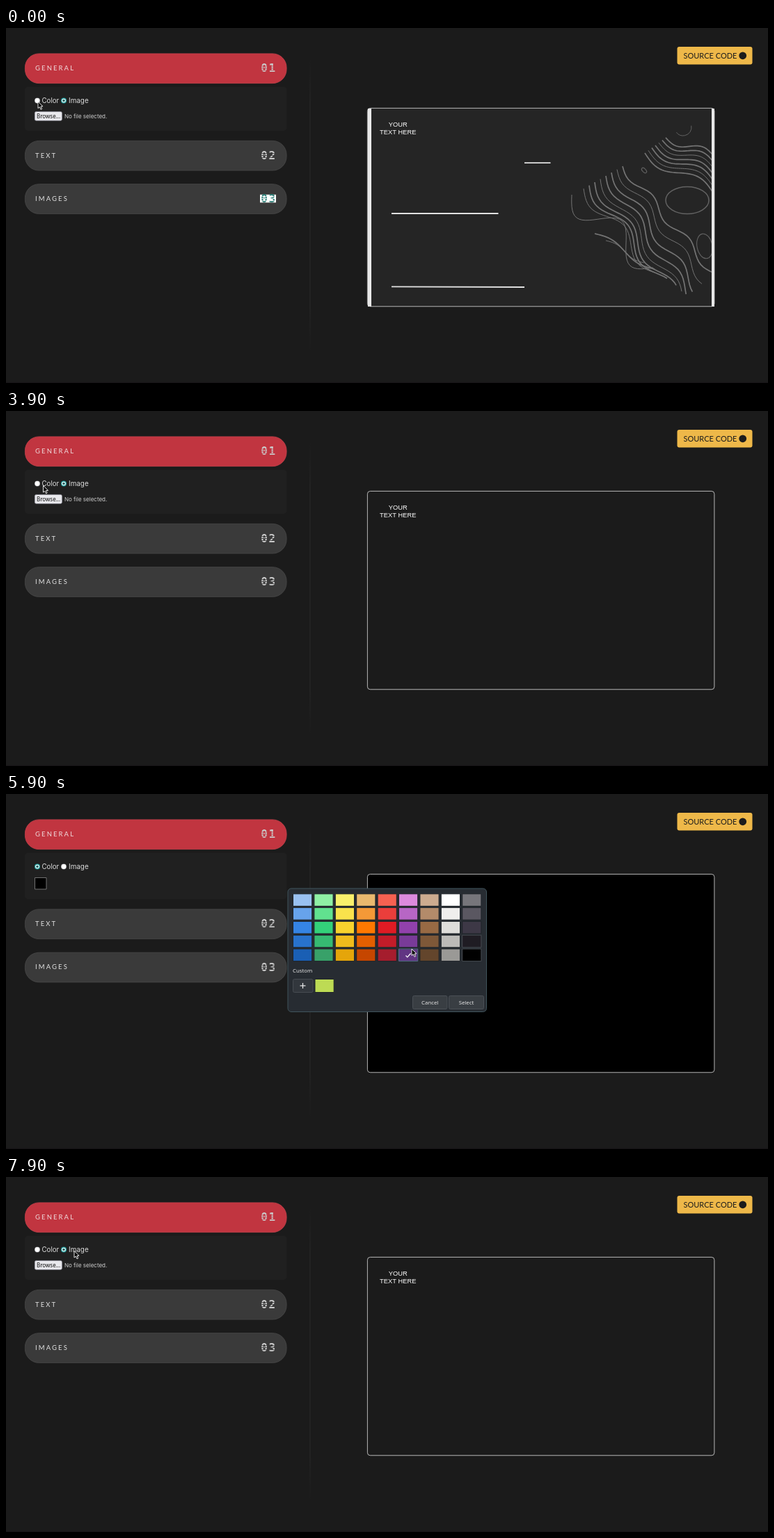
Recreate the animation shown at these times as an HTML page with a canvas. Size 1095 by 511 pixels, loop 8000 ms.

```html
<!DOCTYPE html>
<html lang="en">
<head>
<meta charset="utf-8">
<title>Cover editor</title>
<style>
html, body { margin: 0; width: 100%; height: 100%; overflow: hidden; background: #1b1b1b; }
canvas { display: block; }
</style>
</head>
<body>
<canvas id="stage" width="1095" height="511"></canvas>
<script>
const ctx = document.getElementById('stage').getContext('2d');
const LOOP = 8000;
const SANS = '"Noto Sans", sans-serif';
const UI = 'Inter, sans-serif';
const TITLE = 'Lato, sans-serif';
const PURPLE = '#613583';

// Pointer moves: start time, end time, destination
const GLIDES = [
  [0, 1, 46, 106], [900, 1500, 658, 215], [1700, 2300, 97, 105],
  [2500, 2900, 62, 128], [3300, 3500, 61, 110], [3700, 4100, 46, 105],
  [4200, 4600, 830, 279], [4600, 5090, 49, 127], [5200, 5500, 584, 203],
  [5500, 5900, 583, 223], [6000, 6400, 655, 298], [6450, 6800, 547, 222],
  [6800, 7400, 98, 106.5]
];

// Light, middle and dark shade of each palette column
const SHADES = [
  '99c1f1 3584e4 1a5fb4', '8ff0a4 33d17a 38a169', 'f9f06b f8d32d e5a50a',
  'e9b96e ff7800 c64600', 'f66151 e01b24 a51d2d', 'dc8add 9141ac 613583',
  'cdab8f 986a44 63452c', 'ffffff deddda 9a9996', '77767b 3d3846 000000'
].map(column => column.split(' '));

const clamp = v => Math.max(0, Math.min(1, v));
const mix = (a, b, k) => a + (b - a) * k;
const ease = k => k * k * (3 - 2 * k);

function box(x, y, w, h, r, fill, stroke, width = 1) {
  ctx.beginPath();
  ctx.roundRect(x, y, w, h, r);
  if (fill) { ctx.fillStyle = fill; ctx.fill(); }
  if (stroke) { ctx.strokeStyle = stroke; ctx.lineWidth = width; ctx.stroke(); }
}

function disc(x, y, r, fill) {
  ctx.beginPath();
  ctx.arc(x, y, r, 0, 7);
  ctx.fillStyle = fill;
  ctx.fill();
}

function label(str, x, y, font, fill, align = 'left', spacing = 0) {
  ctx.font = font;
  ctx.fillStyle = fill;
  ctx.textAlign = align;
  ctx.letterSpacing = spacing + 'px';
  ctx.fillText(str, x, y);
  ctx.letterSpacing = '0px';
}

function line(points, color, width) {
  ctx.beginPath();
  points.forEach(([x, y]) => ctx.lineTo(x, y));
  ctx.strokeStyle = color;
  ctx.lineWidth = width;
  ctx.stroke();
}

// A line between two points that swings sideways in a sine wave
function wave(x0, y0, x1, y1, cycles, amp, width) {
  const len = Math.hypot(x1 - x0, y1 - y0);
  const points = Array.from({ length: 41 }, (_, i) => {
    const s = i / 40;
    const swing = amp * Math.sin(2 * Math.PI * cycles * s);
    return [mix(x0, x1, s) - swing * (y1 - y0) / len, mix(y0, y1, s) + swing * (x1 - x0) / len];
  });
  line(points, '#747474', width);
}

function ring(x, y, rx, ry, tilt, width, from = 0, to = 7) {
  ctx.beginPath();
  ctx.ellipse(x, y, rx, ry, tilt, from, to);
  ctx.strokeStyle = '#626262';
  ctx.lineWidth = width;
  ctx.stroke();
}

function picture() {
  ctx.save();
  ctx.fillStyle = '#e8e8e8';
  ctx.fillRect(520, 116, 498, 285);
  ctx.beginPath();
  ctx.rect(525, 116, 489, 285);
  ctx.clip();
  ctx.fillStyle = '#252525';
  ctx.fill();
  line([[745, 194.2], [782.5, 194.2]], '#e2e2e2', 1.8);
  line([[554, 267], [707.5, 267]], '#e2e2e2', 1.8);
  line([[554, 372.3], [745, 373]], '#e2e2e2', 1.8);

  const stroke = n => n % 3 === 1 ? 1 : 1.7;
  for (let n = 0; n < 7; n++)
    wave(918 + 5 * n, 180 - 3.7 * n, 1016, 237 - 9 * n, 1, 9 - n * 0.5, stroke(n));
  for (let n = 0; n < 8; n++)
    wave(886 - 8 * n, 199 + 4.6 * n, 1016 - 12 * n, 352 + 30 * Math.sin(n * Math.PI / 7),
         2.5 - n / 7, 6 + n * 0.6, stroke(n));
  wave(813, 240, 930, 345, 1.5, 20, 1);
  wave(846, 296, 932, 347, 1, -5, 1.7);
  wave(862, 306, 917, 338, 1, -3, 1);
  ring(973, 143, 12, 12, 0, 1, -0.2, 2.5);
  ring(917, 205, 4.5, 2.5, 0.8, 1.1);
  ring(1004, 314, 11, 18, -0.2, 1.1);
  ring(979, 248, 31, 19.5, 0, 1.5);
  ctx.restore();
}

function number(str, y, bg, fill, selected) {
  if (selected) {
    ctx.fillStyle = bg;
    ctx.fillRect(365, y - 11.5, 23, 11.5);
  }
  label(str, 366.3, y - 0.3, 'bold 16px "DejaVu Sans Mono", monospace', fill, 'left', 1.5);
  ctx.fillStyle = bg;
  for (let dy = 3; dy < 10; dy += 3) ctx.fillRect(366, y - dy, 22, 0.8);
}

function section(name, num, y, fill, border, ink, selected) {
  box(27.4, y + 0.4, 375.7, 42.7, 20, fill, border, 0.8);
  label(name, 42, y + 24.5, '9.5px ' + TITLE, ink, 'left', 2.1);
  if (selected) number(num, y + 27, '#ffffff', '#2f8078', true);
  else number(num, y + 27, fill, '#cbcbcb');
}

function radio(x, on) {
  disc(x, 104.5, 4, on ? '#22a3a3' : '#8b8b90');
  disc(x, 104.5, on ? 2.8 : 3.4, '#fff');
  if (on) disc(x, 104.5, 1.7, '#12605f');
}

function settings(colorMode, color, hover) {
  box(27, 84.5, 376.5, colorMode ? 67 : 63.5, 5, '#202020');
  radio(45, colorMode);
  radio(83, !colorMode);
  label('Color', 51.5, 107.8, '9.7px ' + UI, '#dcdcdc');
  label('Image', 90, 107.8, '9.9px ' + UI, '#dcdcdc');
  if (colorMode) {
    box(41.5, 120.5, 16.5, 16.5, 0, color, '#727272');
  } else {
    box(41.4, 120.4, 39, 12.9, 2, hover ? '#d0d0d7' : '#e9e9ed', '#9a9aa5', 0.7);
    label('Browse...', 44, 130, '8px ' + SANS, '#111');
    label('No file selected.', 84, 130, '8px ' + UI, '#cfcfcf');
  }
}

function preview(fill, withPicture) {
  const frame = [519.4, 115.4, 498.5, 285.4, 4];
  box(...frame, fill);
  if (withPicture) picture();
  box(...frame, null, '#e0e0e0', 0.8);
  const font = '9.35px "Liberation Sans", Arial, sans-serif';
  label('YOUR', 563.3, 142, font, '#fff', 'center');
  label('TEXT HERE', 563.3, 153, font, '#fff', 'center');
}

function check(x, y) {
  line([[x - 3.5, y + 0.5], [x - 1.2, y + 2.8], [x + 3.5, y - 2.5]], '#fff', 1.2);
}

function dialogButton(str, x, w, active) {
  box(x, 290.5, w, 19, 2, active ? '#1f5560' : '#393e43', active ? '#2c6f7b' : '#4b5056');
  label(str, x + w / 2, 303, '7.8px ' + SANS, '#e6e6e6', 'center');
}

function shade(column, row) {
  const stop = Math.min(1, Math.floor(row / 2));
  const channel = i => [0, 1].map(n => parseInt(column[stop + n].substr(i, 2), 16));
  const rgb = [0, 2, 4].map(i => Math.round(mix(...channel(i), row / 2 - stop)));
  return `rgb(${rgb})`;
}

function picker(alpha, chosen, selectHover) {
  if (alpha <= 0) return;
  ctx.save();
  ctx.globalAlpha = alpha;
  box(405, 136, 285.5, 177.5, 5, '#272c32', '#40545c');
  SHADES.forEach((column, i) => {
    for (let row = 0; row < 5; row++)
      box(412.5 + i * 30.4, 143.8 + row * 19.8, 27.2, 17.6, 0, shade(column, row),
          i === 8 && row > 2 ? '#454a50' : '#1f2429');
  });
  if (chosen) {
    box(564.5, 223, 27.2, 17.6, 0, null, '#55708a');
    check(578, 232);
  } else check(669, 232);
  label('Custom', 412, 257, '7.8px ' + SANS, '#e2e2e2');
  box(412.5, 266.5, 28.5, 19, 2, '#32373d', '#474c52');
  line([[422.5, 276], [430.5, 276]], '#eee', 1.2);
  line([[426.5, 272], [426.5, 280]], '#eee', 1.2);
  box(444, 266.5, 27.2, 19, 0, '#bddb54', '#1f2429');
  dialogButton('Cancel', 584.5, 49.5, false);
  dialogButton('Select', 636.5, 50, selectHover);
  ctx.restore();
}

function pointer(t) {
  let [, , x, y] = GLIDES[0];
  for (const [from, to, toX, toY] of GLIDES) {
    const k = ease(clamp((t - from) / (to - from)));
    x = mix(x, toX, k);
    y = mix(y, toY, k);
  }
  ctx.save();
  ctx.translate(x, y);
  ctx.beginPath();
  [[0, 0], [0, 9.5], [2.3, 7.6], [4, 11.3], [5.6, 10.5], [4, 7], [7, 6.8]]
    .forEach(point => ctx.lineTo(...point));
  ctx.closePath();
  ctx.fillStyle = '#000';
  ctx.strokeStyle = '#fff';
  ctx.lineWidth = 0.9;
  ctx.fill();
  ctx.stroke();
  ctx.restore();
}

function sourceButton() {
  box(964.5, 27, 108, 25.5, 3, '#eeb849');
  label('SOURCE CODE', 973.5, 43.8, '11px ' + TITLE, '#1c1c1c');
  disc(1058.7, 39.8, 5.4, '#1c1c1c');
}

function divider() {
  const fade = ctx.createLinearGradient(0, 45, 0, 466);
  fade.addColorStop(0, '#1b1b1b');
  fade.addColorStop(0.15, '#222');
  fade.addColorStop(0.85, '#222');
  fade.addColorStop(1, '#1b1b1b');
  ctx.fillStyle = fade;
  ctx.fillRect(436, 45, 2, 421);
}

function draw(t) {
  const start = t < 500;
  const colorMode = (t >= 500 && t < 2400) || (t >= 4100 && t < 7600);
  const color = t >= 6500 ? PURPLE : '#000';
  const shift = colorMode ? 3.5 : 0;

  ctx.fillStyle = '#1b1b1b';
  ctx.fillRect(0, 0, 1095, 511);
  ctx.fillStyle = '#161416';
  ctx.fillRect(0, 510, 1095, 1);
  divider();
  sourceButton();
  section('GENERAL', '01', 36.5, '#c13540', '#c8434d', '#f0dcdd');
  settings(colorMode, color, t >= 2900 && t < 3500);
  section('TEXT', '02', 162 + shift, '#3a3a3a', '#494949', '#e2e2e2');
  section('IMAGES', '03', 224.3 + shift, '#3a3a3a', '#494949', '#e2e2e2', start);
  preview(colorMode ? color : null, start);
  picker(Math.min(clamp((t - 5000) / 300), clamp((7033 - t) / 333)), t >= 5800, t >= 6300);
  pointer(t);
}

function frame(now) {
  draw(Math.floor(now % LOOP / 100) * 100);
  requestAnimationFrame(frame);
}
requestAnimationFrame(frame);
</script>
</body>
</html>
```
